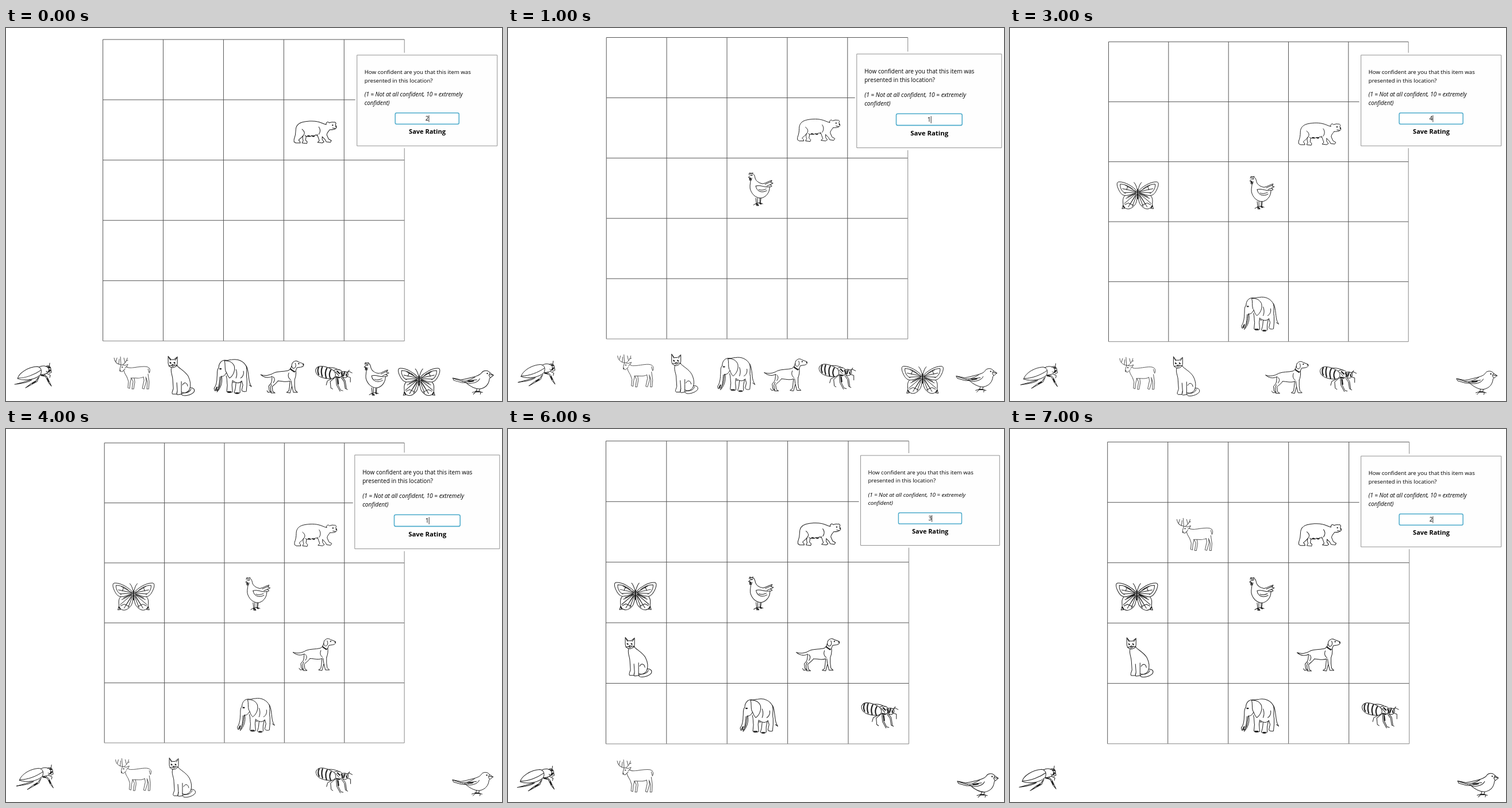
An HTML page for the animation above (8 s loop, 863 px wide and 649 px high).

```html
<!DOCTYPE html>
<html lang="en">
<head>
<meta charset="utf-8">
<title>Item location task</title>
<style>
html, body { margin: 0; width: 100%; height: 100%; overflow: hidden; background: #fff; }
svg { display: block; width: 863px; height: 649px; }
text { font: 9.72px "Open Sans", "Noto Sans", sans-serif; fill: #000; }
.hint { font-size: 9.92px; font-style: italic; }
.save { font-size: 11px; font-weight: 700; text-anchor: middle; }
.digit { font-size: 10px; text-anchor: middle; }
path, rect { fill: none; }
.thin { stroke-width: 1; stroke-linecap: round; stroke-linejoin: round; }
.bold { stroke-width: 2.2; stroke-linecap: round; }
</style>
</head>
<body>
<svg viewBox="0 0 863 649">
  <path id="inner" stroke="#555"/>
  <path id="edge" stroke="#888"/>
  <g id="items"></g>
  <g id="panel">
    <rect x="-3" y="-4" width="249" height="166" style="fill:#fff"/>
    <rect width="244" height="158" stroke="#929292" style="fill:#fefefe" vector-effect="non-scaling-stroke"/>
    <text x="13" y="33">How confident are you that this item was</text>
    <text x="13" y="47.7">presented in this location?</text>
    <text class="hint" x="13" y="72.2">(1 = Not at all confident, 10 = extremely</text>
    <text class="hint" x="13" y="86.7">confident)</text>
    <rect x="66.5" y="100.7" width="111" height="19.5" rx="2.5" stroke="#4dabcb" stroke-width="1.5" style="fill:#fff"/>
    <text id="digit" class="digit" x="122" y="114.2"></text>
    <path d="M125.2 104.7v12" stroke="#222" stroke-width=".9"/>
    <text class="save" x="122.3" y="137.4">Save Rating</text>
  </g>
</svg>
<script>
const NS = "http://www.w3.org/2000/svg";
const $ = id => document.getElementById(id);
const STEP = 1000, BASE = { x: 168.5, y: 20, size: 524.5 };

// panel layouts: x, y, scale
const PANELS = { a: [610.7, 47.1, 1], b: [606.8, 45.2, 1.033], c: [613.5, 46, .991] };

// grid left, grid top, grid size, panel, rating
const SCENES = [
  [168.6, 20, 524.6, "a", 2],
  [171.2, 16.5, 524.5, "b", 1],
  [167.2, 20.2, 528, "a", 6],
  [171.5, 24, 521.7, "a", 4],
  [171.2, 24.2, 521.9, "b", 1],
  [170, 21, 525.5, "c", 5],
  [170.4, 20.9, 527, "c", 3],
  [169.7, 22.7, 525, "a", 2]
];

// tray position, scene in which it is placed, shift into its cell, outlines
const ANIMALS = [
  { at: [500, 162], placed: 0, shift: [0, 0],
    thin: "M57 6C52 5 48 2 42 1C34 -1 22 0 15 2C8 4 4 9 4 16C4 22 3 27 1 32L1 36L4 38L12 38L11 35L9 33C12 30 15 28 17 25" +
      "M17 25C15 29 16 31 17 34L15 38L23 39L24 36L21 33L22 27M20 25L23 27L26 25L29 27L32 25L35 27L38 24L41 25" +
      "M41 23C43 28 44 31 45 34L42 37L50 38L53 36L50 32L50 27M50 27L55 32L57 36L64 37L66 34L61 31L58 24C58 20 62 17 63 15" +
      "M57 6C56 2 60 0 62 3C65 2 68 1 70 2C73 1 75 4 73 6L75 11C73 15 68 15 63 15M68 12L73 13M44 10C47 14 47 19 44 23M15 14C20 18 20 22 17 25",
    bold: "M74 9v.5M68 7h.3M25 26h3M33 26h3" },
  { at: [619, 582], placed: 1, shift: [-207.5, -326.5],
    thin: "M9 5C6 3 6 1 9 1C14 1 15 5 16 10C18 15 23 18 29 19C35 18 40 14 45 13L43 17L47 18L42 21L45 23L41 25" +
      "C41 36 33 43 26 44C16 44 9 36 7 27C6 20 9 14 8 9L4 8L7 5M6 9L6 13L9 13L10 9M5 3L6 0L9 1L12 0" +
      "M17 23C25 20 34 27 41 24M17 23C18 32 27 36 36 31M22 29C27 31 30 30 35 28M33 20L44 15M36 23L43 20" +
      "M17 44L18 53L13 56M18 53L18 57L22 57M24 44L24 52L19 53M24 52L29 54M20 44L20 53M26 44L25 52",
    bold: "M10 4h.2M7 9v2M18 54l3 2M24 53l2 1" },
  { at: [681, 588], placed: 2, shift: [-499, -327], mirror: true,
    thin: "M36 20C29 12 16 4 5 4C0 4 1 10 3 15C6 22 9 27 15 28C22 28 29 25 36 22M29 17C22 11 14 8 7 8C6 14 10 22 16 24" +
      "M15 28C10 33 12 39 12 45L10 51L16 50C22 54 30 49 34 42C36 37 37 31 37 26" +
      "M35 21L16 10M35 21L11 16M35 22L14 23M35 24L17 33M35 24L14 42M35 25L21 48M36 26L28 47M20 12L18 18" +
      "M37 18C35 12 34 8 31 5M33 24L20 30M34 28L24 43M15 44L21 41L30 45",
    bold: "M37.5 18v10M12 46l2 3M37.5 30v3" },
  { at: [361, 575], placed: 3, shift: [39, -110],
    thin: "M9 16C9 8 14 3 20 3C25 4 27 2 32 2C43 0 53 5 57 14C59 21 56 29 58 35L58 46M57 13C62 22 60 38 64 45L66 49L62 46" +
      "M19 4C26 3 33 6 36 13C38 21 34 30 28 34C23 30 24 25 21 22C19 16 21 10 19 4M9 16C5 20 7 26 6 32C6 40 4 48 1 52L2 56C8 56 11 48 12 40L13 31" +
      "M11 32C10 42 10 50 6 58M14 31C16 42 12 52 6 58M13 31C17 32 20 29 22 25" +
      "M22 30C24 36 23 42 24 46L23 57C24 60 30 60 33 58L32 46L33 38M33 41L36 42M39 42L38 52L36 59C38 62 44 62 46 59L46 50L48 40" +
      "M34 39C40 44 46 43 49 39L51 46L49 55C50 58 55 58 57 57L58 46M47 34C51 32 53 27 52 22M39 19C41 24 41 29 39 34",
    bold: "M11 18h2M6 50l-2 4M25 58h5M39 60h4" },
  { at: [443, 578], placed: 4, shift: [55, -217],
    thin: "M55 5C58 1 62 0 66 3L74 6C76 9 74 11 70 12L63 13L61 18M55 5C53 9 54 15 58 14C61 13 62 9 60 5M52 14C54 18 58 20 61 19" +
      "M54 9C53 13 52 16 48 18C40 20 30 19 23 22C17 26 8 28 0 25C7 31 15 31 20 28M61 18C62 24 61 29 59 34M30 36C37 36 44 39 51 36" +
      "M59 34L59 44L60 52L64 56L57 56L54 44L53 36M51 36L50 47L49 53L45 56L51 57L54 46" +
      "M20 28C19 33 20 36 18 40L14 45L15 53L19 55L13 56L11 53M30 36C27 41 22 43 20 46L21 54L25 57L18 57L17 47L19 42M22 29C25 32 25 35 22 39M49 22C47 27 48 31 52 34",
    bold: "M74 7v.5M66 6h.3M52.5 16l6 4" },
  { at: [537, 583], placed: 5, shift: [72.5, -115],
    thin: "M3 9C7 2 22 6 33 13C38 19 37 25 30 27C18 28 6 24 3 18C1 14 1 11 3 9M33 13C38 9 46 11 49 17C48 24 42 28 34 25" +
      "M48 15C53 13 58 16 58 20C57 26 51 27 47 23M55 16L59 14L65 17M57 18L60 12M56 23L62 25L62 33M46 25L51 32L53 44L57 46" +
      "M48 24L53 31L55 44M39 27L40 37L45 47L49 48M37 27L38 38L44 49M34 26L27 32L28 43L31 45M30 27L22 31L20 38M36 15L42 22M22 8C30 7 37 9 42 12",
    bold: "M7 7C5 11 5 16 7 20M13 7C11 12 11 17 13 23M21 9C18 14 18 20 20 26M28 12C25 17 25 22 27 26M52 16L50 22M46 16l2 6M55 19v3M37 24l6 1M39 14l4 4M40 28l1 8" },
  { at: [279, 569], placed: 6, shift: [-80, -211],
    thin: "M3 2L3 14C3 19 7 22 11 22C16 21 19 18 19 14L19 3L13 8L8 8ZM4 4L7 9M18 5L15 9" +
      "M18 18C22 23 33 28 38 37C42 45 43 53 40 60M9 21C6 29 11 35 11 43L12 58C11 63 8 66 11 68L18 68L19 62L18 48" +
      "M19 62C18 66 17 69 20 69L26 68L26 55L26 46M40 60C36 66 30 67 26 64M28 52C31 46 36 48 37 54" +
      "M41 57C47 56 50 60 48 64C44 69 33 72 28 70C25 68 27 66 31 66C38 66 42 62 43 59M9 18L11 20L14 18M12 17L4 19M13 17L19 18",
    bold: "M6.5 13l1 1M13.5 13l1 1M10.5 17h.6" },
  { at: [187, 571], placed: 7, shift: [101, -419.5], ink: "#555",
    thin: "M13 15C7 14 2 11 1 3M4 10L6 3M9 14L10 5M16 15C20 12 23 9 24 3M20 11L18 3M13 15L12 1M22 8L25 7" +
      "M13 15L11 22L11 26L15 27L20 22M13 15L20 16L25 14L23 18L20 20M18 25C19 31 23 34 24 38" +
      "M22 18C25 21 28 20 33 20C43 19 55 16 60 19C64 21 64 26 62 29L60 22M30 38C38 37 45 40 52 36" +
      "M24 38L26 44L25 55L28 56L29 46L31 38M31 38L34 44L32 57L35 57L37 45L36 38" +
      "M52 36L53 42L50 56L53 57L57 44L56 36M57 38L59 45L58 57L61 57L62 45L60 31",
    bold: "M15 19h.4M11.5 24.5v.5" },
  { at: [14, 583], placed: 99, shift: [0, 0],
    thin: "M6 27C8 18 23 7 40 6C47 7 49 13 46 20C38 28 20 32 6 27ZM7 26C20 26 36 20 47 12" +
      "M43 7C50 3 57 5 60 9C62 15 57 20 47 20M55 6C60 3 64 6 64 11C63 16 58 17 56 14M61 7L62 0M64 11L65 16L61 18" +
      "M31 29C24 34 14 35 1 37M29 29L16 33L1 37M42 25L38 31L29 36L20 43M44 23L40 32L20 43" +
      "M49 20L55 24L60 34L65 40M52 19L58 25L65 40M57 18L63 21L62 25",
    bold: "M59 7l3 1M62 12l-2 3M47 21l5 1M58 27l2 5M37 32l-5 3" },
  { at: [777, 595], placed: 99, shift: [0, 0],
    thin: "M71 9L65 5C62 0 54 0 51 4C48 9 43 10 37 12C28 14 19 17 14 17L0 14L2 18L16 22L23 22C30 28 38 33 47 33" +
      "C58 31 63 24 64 15C65 13 68 12 71 9M64 8L71 9M65 5L63 9L65 13M39 12C30 18 23 20 14 19M22 22C32 25 44 22 47 15" +
      "M26 19L42 17M20 21L34 20M2 15L18 20M42 33L41 37L34 39M41 37L36 42M41 37L49 38L48 42M47 33L46 38L52 39",
    bold: "M60 6h.4M28 20l8-1M40 37.5l6 0" }
];

function add(parent, tag, attrs) {
  const el = document.createElementNS(NS, tag);
  for (const k in attrs) el.setAttribute(k, attrs[k]);
  return parent.appendChild(el);
}

for (const a of ANIMALS) {
  a.el = add($("items"), "g", { stroke: a.ink || "#202020" });
  const flips = a.mirror ? ["", "translate(75) scale(-1 1)"] : [""];
  for (const transform of flips)
    for (const kind of ["thin", "bold"])
      add(a.el, "path", { class: kind, d: a[kind], transform });
}

function drawGrid(x, y, size) {
  const right = x + size, bottom = y + size;
  let inner = "";
  for (let i = 0; i < 5; i++) {
    const d = size * i / 5;
    inner += `M${x + d} ${y}V${bottom}M${x} ${y + d}H${right}`;
  }
  $("inner").setAttribute("d", inner);
  $("edge").setAttribute("d", `M${right} ${y}V${bottom}H${x}`);
}

function drawScene(n) {
  const [x, y, size, panel, rating] = SCENES[n];
  drawGrid(x, y, size);
  $("items").setAttribute("transform",
    `translate(${x} ${y}) scale(${size / BASE.size}) translate(${-BASE.x} ${-BASE.y})`);
  for (const a of ANIMALS) {
    const on = n >= a.placed ? 1 : 0;
    a.el.setAttribute("transform", `translate(${a.at[0] + on * a.shift[0]} ${a.at[1] + on * a.shift[1]})`);
  }
  const [px, py, k] = PANELS[panel];
  $("panel").setAttribute("transform", `translate(${px} ${py}) scale(${k})`);
  $("digit").textContent = rating;
}

let shown = -1;
const start = performance.now();
function tick() {
  const n = Math.floor((performance.now() - start) / STEP) % SCENES.length;
  if (n !== shown) drawScene(shown = n);
  requestAnimationFrame(tick);
}
tick();
</script>
</body>
</html>
```
